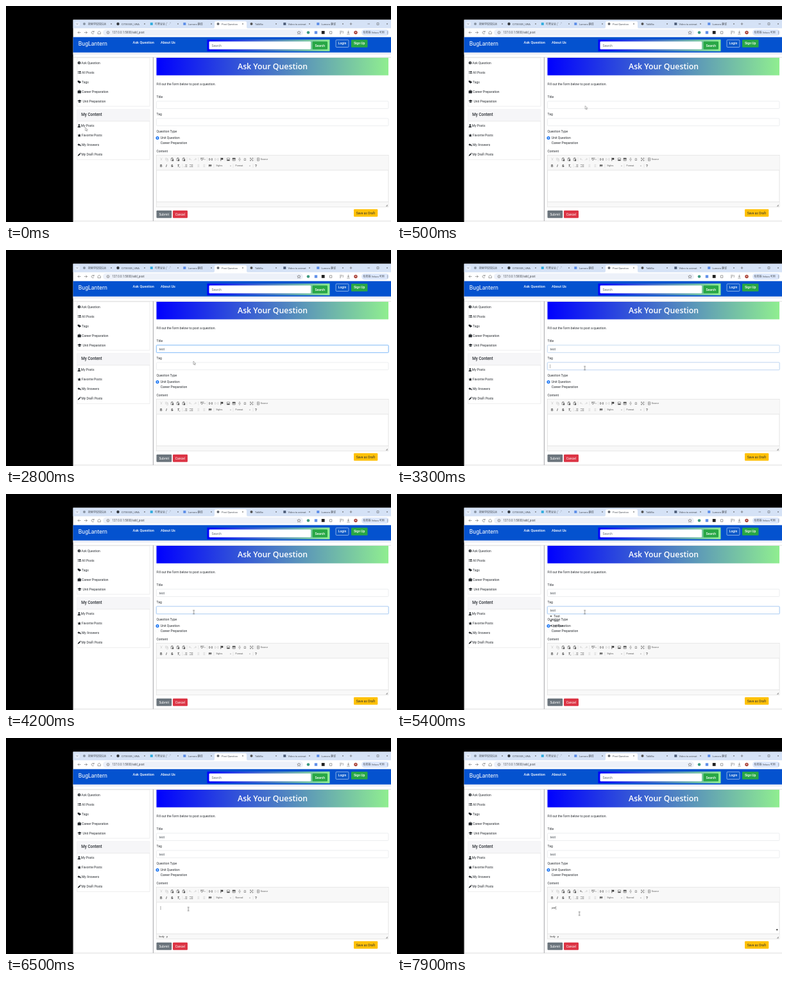
Recreate the animation shown at these times as an HTML page. Size 600x338 px, loop 8 s.

```html
<!DOCTYPE html>
<html lang="en">
<head>
<meta charset="utf-8">
<title>Ask a question</title>
<style>
html, body { margin: 0; width: 100%; height: 100%; overflow: hidden; background: #000; }
#stage { position: absolute; left: 0; top: 0; width: 600px; height: 338px; overflow: hidden; }
svg { position: absolute; left: 0; top: 0; display: block; }
text { font: 5px Roboto, Arial, sans-serif; fill: #2b2f34; white-space: pre; }
.tabs text { font: 4px Roboto, "Noto Sans CJK SC", "Noto Sans CJK", sans-serif; fill: #4a4f57; }
.nav text, .btn { fill: #fff; font-weight: 500; }
.nav .brand { font-size: 8.8px; font-weight: 400; }
.nav .link { font-size: 5.6px; }
.tools text { font: 3.7px Arial, "Liberation Sans", sans-serif; fill: #555; }
.tools .bold { font: bold 4.8px Arial, "Liberation Sans", sans-serif; fill: #444; }
.line { fill: none; stroke: #555; stroke-width: .55; }
.dim { opacity: .3; }
.field { fill: #fff; stroke: #dfe2e6; stroke-width: .6; }

/* Timed parts share one 8 s cycle: 1.25% is 100 ms. */
.timed { animation: 8s step-end infinite; }
.typed { position: absolute; font: 5px/6px Roboto, Arial, sans-serif; color: #495057; white-space: pre; }
#title { left: 238.6px; top: 151.8px; animation-name: type-title; }
#tag { left: 238.6px; top: 178.8px; animation-name: type-tag; }
#body { left: 241px; top: 263px; font: 4.1px/6px "Liberation Sans", Arial, sans-serif; color: #333; animation-name: type-body; }
@keyframes type-title {
  0% { clip-path: inset(0 100% 0 0); } 18.75% { clip-path: inset(0 80.8% 0 0); }
  21.25% { clip-path: inset(0 49.6% 0 0); } 23.75%, 100% { clip-path: inset(0); }
}
@keyframes type-tag {
  0% { clip-path: inset(0 100% 0 0); } 58.75% { clip-path: inset(0 80.8% 0 0); }
  60% { clip-path: inset(0 49.6% 0 0); } 62.5% { clip-path: inset(0 19.2% 0 0); }
  63.75%, 100% { clip-path: inset(0); }
}
@keyframes type-body {
  0% { clip-path: inset(0 100% 0 0); } 91.25% { clip-path: inset(0 85.2% 0 0); }
  93.75% { clip-path: inset(0 37% 0 0); } 97.5%, 100% { clip-path: inset(0); }
}

#caret { animation-name: caret; }
@keyframes caret {
  0% { opacity: 0; transform: translate(238.7px, 152px); }
  7.25% { opacity: 1; transform: translate(238.7px, 152px); }
  13.75% { opacity: 0; transform: translate(238.7px, 152px); }
  18.75% { opacity: 1; transform: translate(240.5px, 152px); }
  21.25% { opacity: 1; transform: translate(243px, 152px); }
  23.75% { opacity: 1; transform: translate(247.3px, 152px); }
  31.25% { opacity: 0; transform: translate(247.3px, 152px); }
  40% { opacity: 1; transform: translate(238.7px, 179px); }
  46.25% { opacity: 0; transform: translate(238.7px, 179px); }
  53.75% { opacity: 1; transform: translate(238.7px, 179px); }
  58.75% { opacity: 1; transform: translate(240.5px, 179px); }
  60% { opacity: 1; transform: translate(243px, 179px); }
  62.5% { opacity: 1; transform: translate(245.6px, 179px); }
  63.75% { opacity: 1; transform: translate(247.3px, 179px); }
  67.5% { opacity: 0; transform: translate(247.3px, 179px); }
  78.75% { opacity: 1; transform: translate(241px, 263px); }
  85% { opacity: 0; transform: translate(241px, 263px); }
  91.25% { opacity: 1; transform: translate(242px, 263px); }
  93.75% { opacity: 1; transform: translate(245px, 263px); }
  97.5%, 100% { opacity: 1; transform: translate(247.6px, 263px); }
}

.focus { fill: none; stroke: #80bdff; stroke-width: .7; opacity: 0; animation: 8s linear infinite; }
.focus + .focus { stroke: #007bff; stroke-opacity: .14; stroke-width: 1.2; }
.on-title { animation-name: focus-title; }
.on-tag { animation-name: focus-tag; }
@keyframes focus-title { 0%, 7.25% { opacity: 0; } 8.75%, 40% { opacity: 1; } 41.9%, 100% { opacity: 0; } }
@keyframes focus-tag { 0%, 40% { opacity: 0; } 41.9%, 78% { opacity: 1; } 79.9%, 100% { opacity: 0; } }

#hints { animation-name: hints; }
@keyframes hints { 0% { opacity: 0; } 67.5% { opacity: 1; } 78.75%, 100% { opacity: 0; } }
.editing { animation-name: editing; }
.idle { animation-name: idle; }
@keyframes editing { 0% { opacity: 0; } 78.75%, 100% { opacity: 1; } }
@keyframes idle { 0% { opacity: 1; } 78.75%, 100% { opacity: 0; } }
.undo { animation-name: undo; }
@keyframes undo { 0% { opacity: .3; } 91.25%, 100% { opacity: 1; } }
.dirty { animation-name: dirty; }
@keyframes dirty { 0% { opacity: 0; } 91.25%, 100% { opacity: 1; } }

#pointer { animation: move 8s ease-in-out infinite; }
@keyframes move {
  0%, 1.25% { transform: translate(123.6px, 190px); }
  7%, 33.5% { transform: translate(299px, 155px); animation-timing-function: linear; }
  35% { transform: translate(292px, 174px); animation-timing-function: ease-out; }
  40%, 68% { transform: translate(292.6px, 184.8px); }
  75% { transform: translate(274.5px, 256.8px); animation-timing-function: ease-out; }
  78.75%, 83% { transform: translate(284.2px, 267.6px); }
  87.5%, 100% { transform: translate(284.2px, 274.8px); }
}
#arrow { animation-name: arrow; }
#beam { animation-name: beam; }
@keyframes arrow { 0% { opacity: 1; } 6.5% { opacity: 0; } 33.7% { opacity: 1; } 36.25% { opacity: 0; } 69.5% { opacity: 1; } 77%, 100% { opacity: 0; } }
@keyframes beam { 0% { opacity: 0; } 6.5% { opacity: 1; } 33.7% { opacity: 0; } 36.25% { opacity: 1; } 69.5% { opacity: 0; } 77%, 100% { opacity: 1; } }
</style>
</head>
<body>
<div id="stage">
<svg width="600" height="338" viewBox="0 0 600 338">
  <defs>
    <linearGradient id="fade"><stop stop-color="#00f"/><stop offset="1" stop-color="#90ee90"/></linearGradient>
    <path id="close" d="M-1-1 1 1M1-1-1 1" fill="none" stroke="#555" stroke-width=".5"/>
    <g id="paste"><path class="line" d="M-1.8-1.8H1.4V2H-1.8Z"/><path d="M-1-2.5H.6V-1.4H-1ZM0 0H2.2V2.4H0Z" fill="#555"/></g>
    <path id="turn" class="line" d="M2 1.6Q1.6-.7-1.6-.5M0-2-1.7-.5 0 1"/>
    <path id="rows" class="line" d="M-.6-1.6H2.3M-.6 0H2.3M-.6 1.6H2.3"/>
    <path id="drop" d="M-.9-.5H.9L0 .6Z" fill="#777"/>
    <path id="split" d="M0-3V3" stroke="#d4d4d4" stroke-width=".5"/>
  </defs>
  <rect width="600" height="338"/>
  <rect x="104.6" y="21.6" width="495.4" height="316.4" fill="#fff"/>

  <g class="tabs">
    <rect x="104.6" y="21.6" width="495.4" height="13.2" fill="#d5e2f6"/>
    <rect x="107" y="24.5" width="8" height="7" rx="2" fill="#e5edfa"/>
    <path class="line" d="m109.5 27.3 1.4 1.4 1.4-1.4"/>
    <path d="M323 35q2 0 2-2v-7q0-2 2-2h46q2 0 2 2v7q0 2 2 2Z" fill="#fff"/>
    <circle cx="122" cy="28" r="2" fill="#8a95a5"/><text x="128" y="29.5">搜索学校短信运</text>
    <circle cx="174.500" cy="28" r="2.200" fill="#33383e"/><text x="180" y="29.5">CITS5505_UWA</text>
    <rect x="224.800" y="26" width="4" height="4" fill="#35aede"/><text x="232" y="29.5">叮咚豆豆 (゜-゜</text>
    <rect x="276.300" y="26" width="4" height="4" fill="#5f8fe8"/><text x="284" y="29.5">Lumoro 翻译</text>
    <circle cx="330.500" cy="28" r="2" fill="#666b72"/><text x="336" y="29.5">Post Question</text>
    <circle cx="382.500" cy="28" r="2" fill="#555"/><text x="388" y="29.5">TalkBix</text>
    <rect x="432.300" y="26" width="4" height="4" fill="#51617c"/><text x="439.5" y="29.5">Video to animat</text>
    <rect x="484.300" y="26" width="4" height="4" fill="#5f8fe8"/><text x="491.5" y="29.5">Lumoro 翻译</text>
    <use href="#close" x="164" y="28"/><use href="#close" x="216" y="28"/><use href="#close" x="268" y="28"/>
    <use href="#close" x="320" y="28"/><use href="#close" x="369" y="28"/><use href="#close" x="421" y="28"/>
    <use href="#close" x="473" y="28"/><use href="#close" x="525" y="28"/>
    <path class="line" d="M535.500 28h4M537.500 26v4M563.500 28h3.500M578 26.500h3v3h-3Z"/>
    <use href="#close" x="594" y="28"/>

    <rect x="151" y="36.500" width="312" height="10" rx="5" fill="#edf1f9"/>
    <path class="line" d="M116.500 41.500h-4.500m2-2-2 2 2 2M122 41.500h4.500m-2-2 2 2-2 2M137 40.500a2 2 0 1 0 .1 2M137.200 38.800v1.800h-1.800M143 41.200l2.200-2 2.200 2v2.500h-4.400Z"/>
    <circle class="line" cx="159" cy="41.500" r="2"/><path class="line" d="M159 41v1.600M159 40v.4"/>
    <text x="165.5" y="43.1" style="font-size:4.5px">127.0.0.1:5000/add_post</text>
    <path class="line" d="m456.500 39 .8 1.700 1.900.2-1.400 1.300.4 1.900-1.700-1-1.700 1 .4-1.900-1.400-1.300 1.900-.2Z"/>
    <circle cx="471" cy="41.500" r="2.300" fill="#3d9a80"/>
    <rect x="480.800" y="39.300" width="4.400" height="4.400" fill="#5f8fe8"/>
    <rect x="491.800" y="39" width="4.800" height="4.800" fill="#222"/>
    <path class="line" d="M504.500 39.800h3.300v3.600h-3.300ZM520 39.500h4M520 41.500h3M520 43.300h2M525.200 39v4"/>
    <path class="line" d="M533.500 38.700v3.500m-1.700-1.500 1.700 1.600 1.700-1.600M531.300 44h4.400"/>
    <circle cx="545" cy="41.500" r="2.700" fill="#a94038"/><circle cx="545" cy="41.200" r="1" fill="#e9c4b8"/>
    <rect x="554" y="36.800" width="43" height="9.600" rx="4.800" fill="#dce7fb"/>
    <text x="556.500" y="43">有新版 Velora 可用</text>
    <path d="M594.500 39.500v.8M594.500 41.200v.8M594.500 43v.8" stroke="#444" stroke-width=".8"/>
  </g>

  <g class="nav">
    <rect x="104.600" y="72.500" width="495.400" height="3.500" fill="#eceef6"/>
    <rect x="104.600" y="48.700" width="495.400" height="24" fill="#0452cf"/>
    <text class="brand" x="112.800" y="62.300">BugLantern</text>
    <text class="link" x="197.500" y="59">Ask Question</text><text class="link" x="241" y="59">About Us</text>
    <rect x="313.500" y="52.500" width="191" height="18.300" fill="url(#fade)"/>
    <rect x="316.500" y="55.600" width="158.500" height="12.200" rx="1.200" fill="#fff"/>
    <text x="320.500" y="63.600" style="fill:#6c757d;font-weight:400">Search</text>
    <rect x="477.500" y="55.600" width="23.500" height="12.200" rx="1.200" fill="#28a745"/><text x="481.600" y="63.500">Search</text>
    <rect x="514" y="53" width="20" height="11.500" rx="1.200" fill="#0a58ca" stroke="#fff" stroke-width=".5"/><text x="517.800" y="60.400">Login</text>
    <rect x="538" y="52.800" width="25.500" height="12" rx="1.200" fill="#28a745"/><text x="542" y="60.400">Sign Up</text>
  </g>

  <g fill="none" stroke="#e2e2e5" stroke-width=".6">
    <path d="M110.800 81H224V157H110.800ZM110.800 162H224V240.500H110.800Z"/>
    <path d="M105 80.300H600M105 336.500H600M105.200 80V336.500" stroke="#c9c9cc"/>
    <path d="M229.400 80.300V336.500" stroke="#a5a5a8" stroke-width="1"/>
  </g>
  <rect x="111" y="162.300" width="112.800" height="17.700" fill="#f6f6f8"/>
  <path d="M111 180.200H224" stroke="#dcdcdf" stroke-width=".6"/>
  <text x="117.300" y="172" style="font-size:6.300px;font-weight:500">My Content</text>
  <g fill="#212529">
    <circle cx="114" cy="89" r="2.300"/><text x="113" y="90.600" style="font-size:4px;font-weight:700;fill:#fff">?</text>
    <path d="M112 102h.9v.9H112Zm1.700 0h3v.9h-3ZM112 103.600h.9v.9H112Zm1.700 0h3v.9h-3ZM112 105.200h.9v.9H112Zm1.700 0h3v.9h-3Z"/>
    <path d="M111.700 116.800h2.200l2.400 2.400-2 2-2.600-2.400ZM114.800 116.800l2.300 2.400-1.900 2 .9-2Z"/>
    <path d="M111.700 132.500h1.500v-1h2.200v1h1.500v4h-5.200ZM113.700 132v.5h1.200V132Z" fill-rule="evenodd"/>
    <path d="m111.300 148.200 3.300-1.500 3.300 1.500-3.300 1.500ZM112.800 149.500l1.800.8 1.800-.8v1.300q-1.800 1-3.600 0Z"/>
    <circle cx="113.900" cy="186.300" r="1.300"/><path d="M111.700 190v-.8q0-1.500 2.200-1.500t2.200 1.500v.8Z"/>
    <path d="m114.200 199.800.8 1.700 1.900.3-1.400 1.300.4 1.900-1.700-.9-1.700.9.400-1.900-1.400-1.300 1.900-.3Z"/>
    <path d="m111.500 217 2.200-1.900v1.200q3.300 0 3.300 3.500-1-1.900-3.300-1.900v1Z"/>
    <path d="m111.800 234.800.5-1.700 2.600-2.600 1.200 1.200-2.600 2.600ZM115.300 230.100l.5-.5 1.200 1.200-.5.500Z"/>
  </g>
  <text x="117.300" y="90.700">Ask Question</text><text x="118" y="105.700">All Posts</text>
  <text x="118" y="120.700">Tags</text><text x="118" y="135.800">Career Preparation</text>
  <text x="119.400" y="150.800">Unit Preparation</text><text x="116.800" y="189.400">My Posts</text>
  <text x="118" y="204.400">Favorite Posts</text><text x="118" y="219.400">My Answers</text>
  <text x="117.500" y="234.300">My Draft Posts</text>

  <rect x="234.500" y="81" width="361.500" height="27.500" fill="url(#fade)"/>
  <text x="361" y="99.300" style="font:600 12.300px 'Open Sans','Noto Sans',sans-serif;fill:#fff">Ask Your Question</text>
  <text x="234.500" y="124">Fill out the form below to post a question.</text>
  <text x="234.500" y="144">Title</text><rect class="field" x="234.500" y="149" width="361.500" height="11.500" rx="1.200"/>
  <text x="234.500" y="171">Tag</text><rect class="field" x="234.500" y="176" width="361.500" height="11.500" rx="1.200"/>
  <rect class="focus on-title" x="234.500" y="149" width="361.500" height="11.500" rx="1.200"/>
  <rect class="focus on-title" x="234" y="148.500" width="362.500" height="12.500" rx="1.600"/>
  <rect class="focus on-tag" x="234.500" y="176" width="361.500" height="11.500" rx="1.200"/>
  <rect class="focus on-tag" x="234" y="175.500" width="362.500" height="12.500" rx="1.600"/>
  <text x="234.500" y="198">Question Type</text>
  <circle cx="236" cy="206.500" r="2.500" fill="#0b6bf2"/><circle cx="236" cy="206.500" r="1" fill="#fff"/>
  <circle cx="236" cy="214.300" r="2.300" fill="#fff" stroke="#f4f4f4" stroke-width=".4"/>
  <text x="240.700" y="208.200">Unit Question</text><text x="240.700" y="216">Career Preparation</text>
  <g id="hints" class="timed">
    <circle cx="240" cy="191.200" r=".9"/><text x="244.300" y="192.900">Test</text>
    <circle cx="240" cy="198.700" r=".9"/><text x="244.300" y="200.400">test</text>
    <circle cx="240" cy="206.200" r=".9"/><text x="244.300" y="207.900">python</text>
  </g>
  <text x="234.500" y="228.600">Content</text>

  <g class="tools">
    <rect x="234.500" y="233.500" width="361.500" height="81" fill="#fff" stroke="#d1d1d1" stroke-width=".6"/>
    <path d="M234.800 233.800H595.700V257H234.800ZM234.800 306.500H595.700V314.200H234.800Z" fill="#f8f8f8"/>
    <path d="M234.500 257H596M234.500 306.500H596" stroke="#d8d8d8" stroke-width=".6"/>
    <path d="m594.700 310.500v3h-3Z" fill="#999"/>
    <g class="dim">
      <path class="line" d="m240.500 237.500 2.500 4M243.500 237.500l-2.500 4M248.500 238h2.500v3h-2.500ZM250 239.500h2.500v3H250"/>
      <use href="#turn" transform="translate(295 240) scale(-1 1)"/>
      <path class="line" d="M326 240h4.500M327 238.500h-1.500v3h1.500M329.500 238.500h1.500v3h-1.500"/>
      <use href="#rows" x="299" y="250"/><use href="#rows" x="308" y="250"/>
    </g>
    <use href="#paste" x="259" y="240"/><use href="#paste" x="268" y="240"/><use href="#paste" x="277" y="240"/>
    <use class="timed undo" href="#turn" x="287" y="240"/>
    <text x="303" y="239.500" style="font-size:2.800px">ABC</text><path class="line" d="m304 240.500 1.200 1.500 2.500-3"/><use href="#drop" x="310" y="240.300"/>
    <path class="line" d="M317 240h4M318 238.600h-1.500v2.800h1.500M320 238.600h1.500v2.800H320"/>
    <path d="M334.500 237.500h.7v5h-.7ZM335.400 237.800h2.900v2.600h-2.900Z" fill="#333"/>
    <path class="line" d="M344.200 238h4.400v4h-4.400ZM353 238h4.300v4H353ZM353 239.700h4.300M355.200 238v4M362 240h4M363 238h2M363 242h2"/>
    <path d="m344.300 242 1.500-2.200 1.200 1 .6-.6 1 1.800ZM353 238h4.300v1.200H353Z" fill="#444"/>
    <text x="370.500" y="242" style="font-size:5px">Ω</text>
    <path class="line" d="m381 238 3.500 4M384.500 238l-3.500 4M380.500 239.300v-1.500h1.300M385 239.300v-1.500h-1.300M380.500 240.700v1.500h1.300M385 240.700v1.500h-1.300"/>
    <path class="line" d="M391.500 237.800h3v4.400h-3ZM392 240h2"/><text x="396.500" y="241.400">Source</text>
    <text class="bold" x="240" y="252">B</text><text class="bold" x="249.300" y="252" style="font-style:italic">I</text>
    <text class="bold" x="257.300" y="252" style="text-decoration:line-through">S</text>
    <text class="bold" x="267" y="251.700" style="font-style:italic">T</text><text x="270" y="252.500" style="font-size:2.600px">x</text>
    <use href="#rows" x="280" y="250"/><text x="277.300" y="251.500" style="font-size:2.500px">1</text>
    <use href="#rows" x="289" y="250"/><path d="M286.500 248h1v1h-1ZM286.500 251h1v1h-1Z" fill="#444"/>
    <path d="M316 248.300h1.700v1.700l-1 1.600h-.7l.5-1.400h-.5ZM318.400 248.300h1.700v1.700l-1 1.600h-.7l.5-1.400h-.5Z" fill="#333"/>
    <text x="327.300" y="251.300">Styles</text><use href="#drop" x="350" y="250.300"/>
    <text class="timed idle" x="357.500" y="251.300">Format</text><text class="timed editing" x="357.500" y="251.300">Normal</text>
    <use href="#drop" x="380" y="250.300"/><text class="bold" x="388" y="252">?</text>
    <use href="#split" x="282" y="240"/><use href="#split" x="300" y="240"/><use href="#split" x="313.500" y="240"/>
    <use href="#split" x="341" y="240"/><use href="#split" x="388" y="240"/><use href="#split" x="275" y="250"/>
    <use href="#split" x="324" y="250"/><use href="#split" x="354" y="250"/><use href="#split" x="385" y="250"/>
    <g class="timed editing"><text x="238.500" y="311.600" style="font-weight:700;font-size:3.400px">body</text><text x="250" y="311.600" style="font-weight:700;font-size:3.400px">p</text></g>
    <circle class="timed dirty" cx="592.300" cy="300" r="1.200" fill="#444"/>
  </g>

  <rect x="234.500" y="320" width="23.700" height="11.800" rx="1.200" fill="#6c757d"/><text class="btn" x="238.400" y="327.600" style="font-weight:400">Submit</text>
  <rect x="260" y="320" width="23" height="11.800" rx="1.200" fill="#dc3545"/><text class="btn" x="263.700" y="327.600" style="font-weight:400">Cancel</text>
  <rect x="542" y="318" width="37.300" height="11.800" rx="1.200" fill="#ffc107"/><text x="545.700" y="325.600">Save as Draft</text>
</svg>
<div id="title" class="typed timed">test</div>
<div id="tag" class="typed timed">test</div>
<div id="body" class="typed timed">jwd</div>
<svg width="600" height="338" viewBox="0 0 600 338">
  <path id="caret" class="timed" d="M0 0V6" stroke="#555" stroke-width=".5"/>
  <g id="pointer">
    <path id="arrow" class="timed" d="M0 0V5.200L1.200 4.100 2 6 2.900 5.600 2.100 3.800H3.700Z" fill="#fff" stroke="#666" stroke-width=".5"/>
    <path id="beam" class="timed" d="M-1.300-2.800H1.300M0-2.800V2.800M-1.300 2.800H1.300" fill="none" stroke="#444" stroke-width=".6"/>
  </g>
</svg>
</div>
</body>
</html>
```
